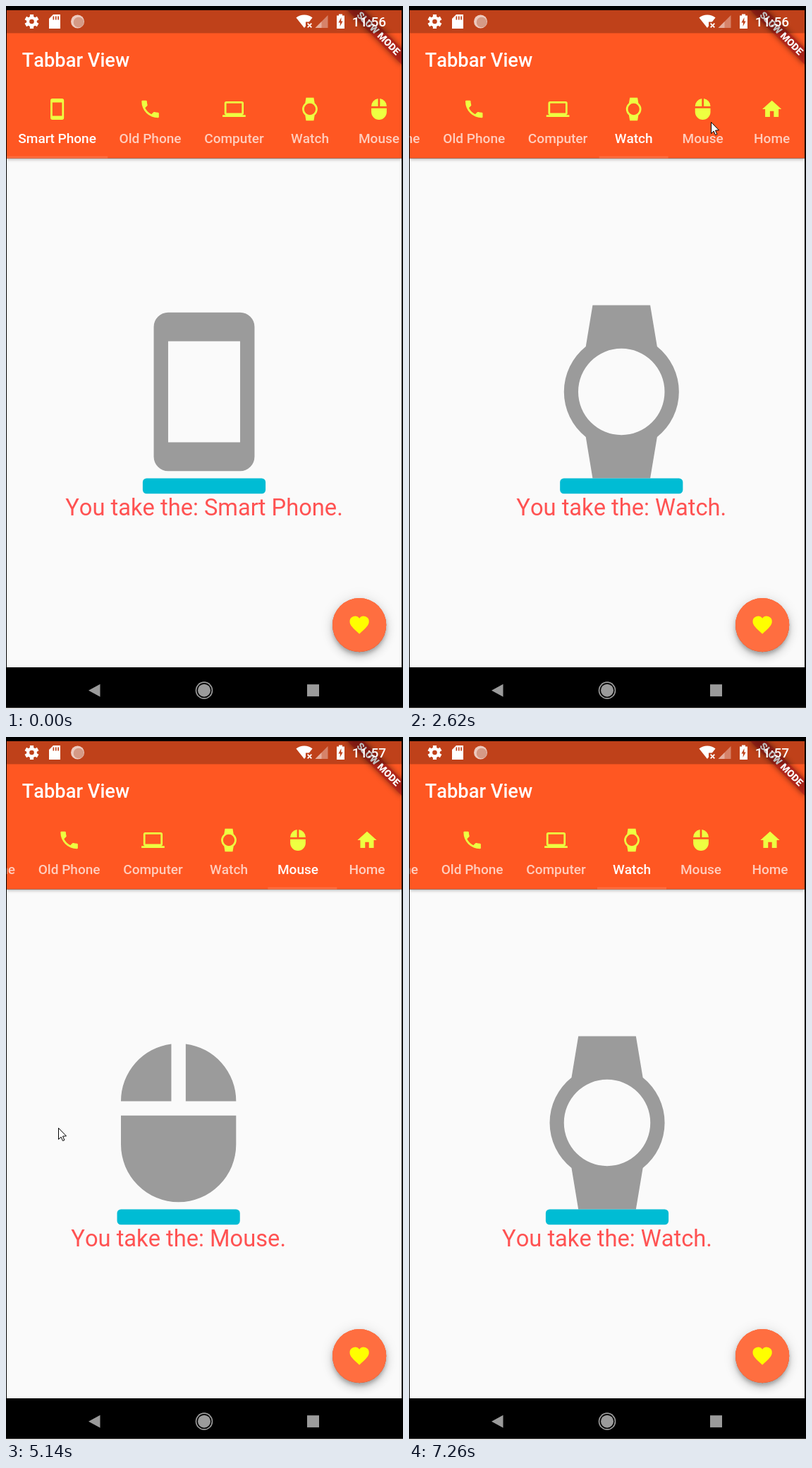
Recreate the animation shown at these times as an HTML page with a canvas. Size 563x995 px, loop 7870 ms.

```html
<!DOCTYPE html>
<html lang="en">
<head>
<meta charset="utf-8">
<title>Tabbar View</title>
<style>
  html, body { margin: 0; width: 100%; height: 100%; overflow: hidden; background: #000; }
  canvas { display: block; width: 563px; height: 995px; }
</style>
</head>
<body>
<canvas id="stage" width="563" height="995"></canvas>
<script>
const ctx = document.getElementById('stage').getContext('2d');
const LOOP = 7870;
const LEFT = 1, TOP = 5.8, WIDTH = 560, RIGHT = LEFT + WIDTH, CENTER = LEFT + WIDTH / 2;
const DP = WIDTH / 411.43;
const TOOLBAR = TOP + 24 * DP, TABS = TOOLBAR + 56 * DP, BODY = TABS + 74 * DP, NAV = 936;
const ORANGE = '#ff5722', ACCENT = '#ff6e40', STATUS = '#bf411a', GRAY = '#9b9b9b';
ctx.fontKerning = 'none';

// Icon shapes on a 24-unit grid
function boxes(...list) {
  const path = new Path2D();
  for (const [x, y, w, h, r = 0] of list) path.roundRect(x, y, w, h, r);
  return path;
}
const icons = {
  phone: boxes([5, 1, 14, 22, 2], [7, 5, 10, 14]),
  computer: boxes([2, 4, 20, 14, 2], [4, 6, 16, 10], [0, 18, 24, 2]),
  watch: new Path2D('M8 0h8l.96 5.73A8 8 0 0 1 16.96 18.27L16 24H8l-.95-5.73A8 8 0 0 1 7.05 5.73zM18 12A6 6 0 1 1 6 12A6 6 0 1 1 18 12z'),
  mouse: new Path2D('M13 1.07V9h7A8 8 0 0 0 13 1.07zM11 1.07V9H4A8 8 0 0 1 11 1.07zM4 11h16v4A8 8 0 0 1 4 15z'),
  home: new Path2D('M10 20v-6h4v6h5v-8h3L12 3 2 12h3v8z'),
  heart: new Path2D('M12 21.35C5.4 15.36 2 12.28 2 8.5A5.5 5.5 0 0 1 12 5.09A5.5 5.5 0 0 1 22 8.5C22 12.28 18.6 15.36 12 21.35z'),
  call: new Path2D('M6.62 10.79c1.44 2.83 3.76 5.14 6.59 6.59l2.2-2.2q.44-.44 1.02-.24 1.7.57 3.57.57 1 0 1 1V20q0 1-1 1A17 17 0 0 1 3 4q0-1 1-1h3.5q1 0 1 1 0 1.87.57 3.57 .18.58-.25 1.02z')
};

const clamp = (v, lo = 0, hi = 1) => Math.max(lo, Math.min(hi, v));
const mix = (a, b, k) => a + (b - a) * k;
const smooth = k => k * k * (3 - 2 * k);
const font = (size, weight) => `${weight} ${size * DP}px Roboto, sans-serif`;

// cubic-bezier(.25, .1, .25, 1)
function ease(k) {
  const bezier = (u, a, b) => 3 * a * u * (1 - u) ** 2 + 3 * b * u * u * (1 - u) + u ** 3;
  let lo = 0, hi = 1;
  for (let i = 0; i < 20; i++) {
    const mid = (lo + hi) / 2;
    if (bezier(mid, .25, .25) < k) lo = mid; else hi = mid;
  }
  return bezier(lo, .1, 1);
}

// Tabs are as wide as their label plus padding, at least 72dp.
let tabEnd = LEFT;
const tabs = [
  ['Smart Phone', 'phone'], ['Old Phone', 'call'], ['Computer', 'computer'],
  ['Watch', 'watch'], ['Mouse', 'mouse'], ['Home', 'home']
].map(([label, icon]) => {
  ctx.font = font(14, 500);
  const w = Math.max(72 * DP, ctx.measureText(label).width + 24 * DP);
  const x = tabEnd;
  tabEnd += w;
  return { label, icon, x, w, center: x + w / 2 };
});
const maxScroll = tabEnd - RIGHT;
for (const tab of tabs) tab.scroll = clamp(tab.center - CENTER, 0, maxScroll);

const taps = [1147, 1915, 2393].map(start => ({ start, length: 300, step: 1 }));
const swipes = [
  { start: 4640, length: 420, step: 1 },
  { start: 5054, length: 560, step: 1 },
  { start: 6020, length: 480, step: -1 },
  { start: 6600, length: 580, step: -1 }
];

// Sum of all page turns so far; speed > 1 makes taps finish early.
function pageAt(t, speed = 1) {
  const turned = (moves, curve, rate) => moves.reduce((sum, m) =>
    sum + m.step * curve(clamp((t - m.start) / m.length * rate)), 0);
  return turned(taps, ease, speed) + turned(swipes, smooth, 1);
}

function between(page, key) {
  return mix(tabs[Math.floor(page)][key], tabs[Math.ceil(page)][key], page % 1);
}

function scrollAt(t, page) {
  const drag = Math.sin(Math.PI * clamp((t - 3050) / 1100));
  return between(page, 'scroll') - maxScroll * drag;
}

// Pointer stops: arrival time, travel time, x, y
const stops = [
  [400, 1, 229, 288], [700, 300, 186, 187], [960, 90, 196, 170],
  [1950, 40, 322, 168], [2430, 40, 428, 164], [3600, 550, 448, 172],
  [4150, 550, 330, 172], [4550, 400, 287, 469], [4640, 90, 440, 500],
  [5140, 500, 74, 553], [6020, 720, 361, 585], [6230, 210, 469, 583],
  [6600, 370, 300, 590], [6800, 200, 490, 590], [7210, 400, 563, 995]
];
function pointerAt(t) {
  let [, , x, y] = stops[0];
  for (const [arrive, travel, toX, toY] of stops) {
    const k = clamp((t - arrive + travel) / travel);
    x = mix(x, toX, k);
    y = mix(y, toY, k);
  }
  return [x, y];
}

function rect(x, y, w, h, color) {
  ctx.fillStyle = color;
  ctx.fillRect(x, y, w, h);
}

function disc(x, y, r, color) {
  ctx.fillStyle = color;
  ctx.beginPath();
  ctx.arc(x, y, r, 0, Math.PI * 2);
  ctx.fill();
}

function poly(points, color) {
  ctx.fillStyle = color;
  ctx.beginPath();
  points.forEach(([x, y]) => ctx.lineTo(x, y));
  ctx.closePath();
  ctx.fill();
}

function text(str, x, y, size, weight, color, align = 'center') {
  ctx.font = font(size, weight);
  ctx.textAlign = align;
  ctx.fillStyle = color;
  ctx.fillText(str, x, y);
}

function icon(name, x, y, size, color) {
  ctx.save();
  ctx.translate(x, y);
  ctx.scale(size * DP / 24, size * DP / 24);
  ctx.translate(-12, -12);
  ctx.fillStyle = color;
  ctx.fill(icons[name], 'evenodd');
  ctx.restore();
}

function shadowed(alpha, dy, blur, paint) {
  ctx.save();
  ctx.shadowColor = `rgba(0,0,0,${alpha})`;
  ctx.shadowOffsetY = dy * DP;
  ctx.shadowBlur = blur * DP;
  paint();
  ctx.restore();
}

function drawPages(page) {
  rect(LEFT, BODY, WIDTH, NAV - BODY, '#fafafa');
  tabs.forEach((tab, i) => {
    if (Math.abs(i - page) >= 1) return;
    const x = CENTER + (i - page) * WIDTH;
    icon(tab.icon, x, 546, 180, GRAY);
    ctx.fillStyle = '#00bcd4';
    ctx.beginPath();
    ctx.roundRect(x - 64 * DP, 668.5, 128 * DP, 16 * DP, 4 * DP);
    ctx.fill();
    text(`You take the: ${tab.label}.`, x, 720.5, 24, 400, '#ff5252');
  });
}

function drawFab() {
  const x = RIGHT - 44 * DP, y = NAV - 44 * DP;
  for (const [alpha, dy, blur] of [[.12, 1, 14], [.14, 5, 9], [.2, 3, 4]])
    shadowed(alpha, dy, blur, () => disc(x, y, 28 * DP, ACCENT));
  icon('heart', x, y, 24, '#ffff00');
}

function drawAppBar(t, page) {
  const scroll = scrollAt(t, page);
  shadowed(.4, 1.5, 4, () => rect(LEFT, TOP, WIDTH, BODY - TOP, ORANGE));
  text('Tabbar View', LEFT + 16 * DP, TOOLBAR + 34.9 * DP, 20, 500, '#fff', 'left');

  taps.slice(0, 2).forEach(({ start }, i) => {
    const tab = tabs[i + 1];
    const glow = clamp((t - start) / 80) * clamp((start + 420 - t) / 200);
    rect(tab.x - scroll, TABS, tab.w, BODY - TABS, `rgba(255,255,255,${.05 * glow})`);
  });

  tabs.forEach((tab, i) => {
    const x = tab.center - scroll;
    const alpha = mix(.7, 1, clamp(1 - Math.abs(i - page)));
    icon(tab.icon, x, TABS + 23 * DP, 24, '#eeff41');
    text(tab.label, x, TABS + 58 * DP, 14, 500, `rgba(255,255,255,${alpha})`);
  });

  const marked = pageAt(t, 1.8);
  rect(between(marked, 'x') - scroll, BODY - 2 * DP, between(marked, 'w'), 2 * DP, ACCENT);
}

function drawBanner() {
  const ribbon = [-40 * DP, 28 * DP, 80 * DP, 12 * DP];
  ctx.save();
  ctx.translate(RIGHT, TOP);
  ctx.rotate(Math.PI / 4);
  ctx.filter = 'blur(4.5px)';
  rect(...ribbon, 'rgba(0,0,0,.5)');
  ctx.filter = 'none';
  rect(...ribbon, 'rgba(183,28,28,.63)');
  text('SLOW MODE', 0, 37.6 * DP, 10.2, 900, '#fff');
  ctx.restore();
}

function drawStatusBar(t) {
  const y = 22;
  rect(LEFT, TOP, WIDTH, TOOLBAR - TOP, 'rgba(0,0,0,.25)');

  // gear
  for (let i = 0; i < 3; i++) {
    ctx.save();
    ctx.translate(36.5, y);
    ctx.rotate(i * Math.PI / 3);
    rect(-2.6, -10, 5.2, 20, '#fff');
    ctx.restore();
  }
  disc(36.5, y, 7.4, '#fff');
  disc(36.5, y, 3.3, STATUS);

  // memory card
  poly([[67, 12], [77, 12], [77, 32], [61, 32], [61, 18]], '#fff');
  for (let i = 0; i < 3; i++) rect(66.5 + i * 3.4, 14.5, 1.7, 5, STATUS);

  // sync disc
  disc(101.5, y, 9.5, 'rgba(255,255,255,.72)');
  disc(103, y + 1, 7.3, '#d59a86');

  // wireless fan with a cross
  ctx.fillStyle = '#fff';
  ctx.beginPath();
  ctx.moveTo(423, 31);
  ctx.arc(423, 31, 18.5, -Math.PI * .715, -Math.PI * .285);
  ctx.fill();
  rect(425, 22.5, 11, 10, STATUS);
  ctx.save();
  ctx.translate(430.5, 27.5);
  ctx.rotate(Math.PI / 4);
  rect(-4, -.9, 8, 1.8, '#fff');
  rect(-.9, -4, 1.8, 8, '#fff');
  ctx.restore();

  // signal
  for (const size of [18, 9])
    poly([[438.5, 31], [438.5 + size, 31], [438.5 + size, 31 - size]], 'rgba(255,255,255,.35)');

  // battery
  rect(472, 11.5, 5, 3, '#fff');
  rect(469, 13.5, 11, 18.5, '#fff');
  poly([[475.5, 16], [471.5, 23.5], [474, 23.5], [473.5, 29], [477.6, 21.5], [475.2, 21.5]], STATUS);

  text(t < 2900 ? '11:56' : '11:57', 515, 29.3, 14, 500, '#fff');
}

function drawNavBar() {
  const y = NAV + 24 * DP;
  rect(0, NAV, 563, 57.5, '#000');
  poly([[117, y], [133.5, y - 9], [133.5, y + 9]], GRAY);
  disc(CENTER, y, 12.3, GRAY);
  disc(CENTER, y, 10.6, '#000');
  disc(CENTER, y, 9, GRAY);
  rect(427, y - 8.5, 17, 17, GRAY);
  rect(0, NAV + 57.5, 563, 2, '#fff');
}

function drawPointer(t) {
  if (t < 400 || t >= 7210) return;
  const [x, y] = pointerAt(t);
  ctx.save();
  ctx.translate(Math.round(x) + .5, Math.round(y) + .5);
  poly([[0, 0], [0, 16], [3.6, 12.6], [6, 18], [8.4, 17], [6, 11.6], [11, 11.3]], '#fff');
  ctx.strokeStyle = '#000';
  ctx.lineWidth = 1;
  ctx.stroke();
  ctx.restore();
}

function draw(t) {
  const page = pageAt(t);
  rect(0, 0, 563, 995, '#000');
  ctx.save();
  ctx.beginPath();
  ctx.rect(LEFT, TOP, WIDTH, NAV - TOP);
  ctx.clip();
  drawPages(page);
  drawFab();
  drawAppBar(t, page);
  drawBanner();
  drawStatusBar(t);
  ctx.restore();
  drawNavBar();
  drawPointer(t);
}

const begin = performance.now();
function tick() {
  draw((performance.now() - begin) % LOOP);
  requestAnimationFrame(tick);
}
tick();
</script>
</body>
</html>
```
